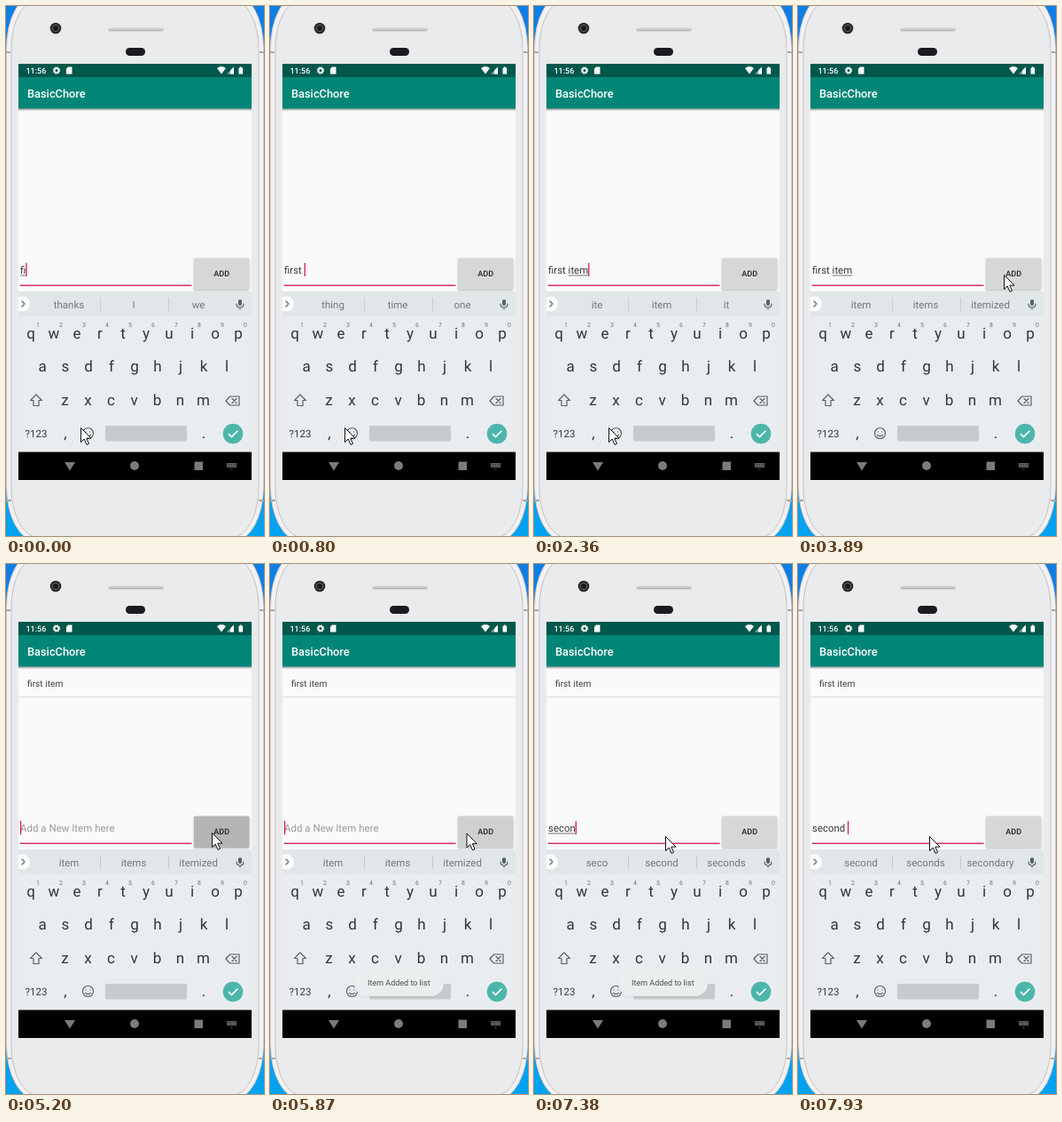
An HTML page that plays this animation: 291 px wide and 596 px high, repeating every 8000 ms.

```html
<!DOCTYPE html>
<html lang="en">
<head>
<meta charset="utf-8">
<title>To-do list on a phone</title>
<style>
html, body { margin: 0; width: 100%; height: 100%; overflow: hidden; background: linear-gradient(#0f7de4, #02a2f0); }
svg { display: block; width: 100%; height: 100%; font-family: Roboto, sans-serif; }
text { white-space: pre; text-rendering: geometricPrecision; }
.mid { text-anchor: middle; }
.line { fill: none; stroke: #55636a; stroke-width: 1.2; stroke-linecap: round; stroke-linejoin: round; }
#keys { font-size: 17px; fill: #2c383e; }
#keys .digit { font-size: 7px; fill: #69757b; }
#words { font-size: 11.5px; fill: #6f7a80; }
#entry { font-size: 11.4px; fill: #3a3a3a; }
#hint { font-size: 11.5px; fill: #9b9b9b; }
</style>
</head>
<body>
<svg viewBox="0 0 291 596">
  <defs>
    <linearGradient id="shade" x2="0" y2="1">
      <stop stop-color="#000" stop-opacity=".36"/>
      <stop offset="1" stop-color="#000" stop-opacity="0"/>
    </linearGradient>
    <filter id="lift" x="-20%" y="-30%" width="140%" height="170%">
      <feDropShadow dx="0" dy="1" stdDeviation="1" flood-opacity=".28"/>
    </filter>
    <filter id="glow" x="-20%" y="-30%" width="140%" height="170%">
      <feDropShadow dx="0" dy="1" stdDeviation="1" flood-opacity=".08"/>
    </filter>
    <clipPath id="screen"><rect x="14" y="65" width="263" height="468"/></clipPath>
  </defs>

  <!-- Phone body -->
  <rect x=".5" y="-14" width="290" height="616" rx="34" ry="62" fill="#f3f1f2" stroke="#cbc3c5"/>
  <rect x="6" y="-8" width="279" height="606" rx="31" ry="56" fill="#e9ebec" stroke="#c6c1c3"/>
  <path d="M0 52h5M286 52h5M0 556h6M285 556h6" stroke="#a9a5a7" stroke-width="2"/>
  <circle cx="56" cy="25" r="6.3" fill="#2a2a2c"/>
  <circle cx="56" cy="25" r="3.600" fill="#18181b" stroke="#66666a"/>
  <rect x="115" y="24.500" width="63" height="4.200" rx="2.100" fill="#cfcfd1"/>
  <path d="M116.500 27.500h60" stroke="#b2b2b5"/>
  <rect x="135" y="47" width="22" height="9" rx="4.500" fill="#1b1b1f"/>

  <g clip-path="url(#screen)">
    <rect x="14" y="65" width="263" height="256" fill="#fafafa"/>

    <!-- Status bar and title -->
    <rect x="14" y="65" width="263" height="15" fill="#00574b"/>
    <rect x="14" y="80" width="263" height="35.500" fill="#008577"/>
    <rect x="14" y="115.500" width="263" height="3" fill="url(#shade)"/>
    <g fill="#fff">
      <text x="22.500" y="76" font-size="9" font-weight="500">11:56</text>
      <circle cx="57" cy="72.500" r="2.500" fill="none" stroke="#fff" stroke-width="1.800"/>
      <circle cx="57" cy="72.500" r="3.800" fill="none" stroke="#fff" stroke-width="1" stroke-dasharray="1.500 1.480"/>
      <path d="M70 68.500h4.500v8h-6.500v-6z"/>
      <path d="M238 70q5-4 10 0l-5 6.500z"/>
      <path d="M257 68.500v8h-8z" opacity=".5"/>
      <path d="M257 68.500v8h-4v-4z"/>
      <path d="M262.500 69.500h1.300v-1h2v1h1.300v7h-4.600z"/>
      <text x="24" y="102.800" font-size="12.800" font-weight="500">BasicChore</text>
    </g>

    <g id="item">
      <text x="24" y="137.500" font-size="10.200" fill="#3c3c3c">first item</text>
      <path d="M14 149.500h263" stroke="#dedede"/>
    </g>

    <!-- Entry row -->
    <text id="hint" x="16" y="301">Add a New Item here</text>
    <text id="entry" x="16" y="301"><tspan id="done"></tspan><tspan id="draft"></tspan></text>
    <path id="underline" stroke="#555" stroke-width=".8"/>
    <rect id="caret" y="289" width="1.300" height="15" fill="#d81b60"/>
    <path d="M16 314.200h193.500" stroke="#d8316c" stroke-width="1.400"/>
    <rect id="button" x="212" y="283.500" width="62.500" height="35.500" rx="1.500" filter="url(#lift)"/>
    <text class="mid" x="243.200" y="304" font-size="9" font-weight="500" fill="#222">ADD</text>

    <!-- Keyboard -->
    <rect x="14" y="321" width="263" height="181" fill="#e9edf0"/>
    <rect x="14" y="321" width="263" height="28" fill="#e1e6e9"/>
    <circle cx="18.500" cy="335" r="8.500" fill="#fff"/>
    <path class="line" d="M18 332l3 3-3 3"/>
    <path d="M106.500 328v15M183.500 328v15" stroke="#c6ccd0"/>
    <g id="words"></g>
    <rect x="262" y="330" width="4" height="7" rx="2" fill="#55636a"/>
    <path class="line" d="M260 335q0 4 4 4t4-4M264 339v2"/>
    <g id="keys"></g>
    <path class="line" d="M34 437l6.500 6.500h-3.500v6h-6v-6h-3.500z"/>
    <path class="line" d="M252.500 439h10.500v10h-10.500l-4.500-5zM255 441.500l5 5m0-5l-5 5"/>
    <circle class="line" cx="92.500" cy="480.500" r="6"/>
    <path class="line" d="M90.300 478.800v.1M94.700 478.800v.1M89.500 482.300q3 3 6 0"/>
    <rect x="112" y="472" width="92" height="17.500" rx="1.500" fill="#c8cbcd"/>
    <circle cx="256" cy="481" r="11.300" fill="#4db6ac"/>
    <path d="M251 481l3.500 3.500 7-7" fill="none" stroke="#fff" stroke-width="1.600"/>

    <!-- Navigation bar -->
    <rect x="14" y="501.500" width="263" height="32"/>
    <g fill="#7b7b7b">
      <path d="M66 513h12l-6 9.500z"/>
      <circle cx="145" cy="517" r="5"/>
      <rect x="212.500" y="512.500" width="9.500" height="9.500"/>
      <path d="M249 514h11v5h-11zM253 520.500h3l-1.500 1.500z" opacity=".8"/>
      <path d="M250 515.500h9M250 517.500h9" stroke="#111" stroke-width=".7" stroke-dasharray="1 1"/>
    </g>

    <g id="toast">
      <rect x="95" y="457" width="101" height="29" rx="14.500" fill="#ebeeef" filter="url(#glow)"/>
      <text class="mid" x="145.300" y="474.300" font-size="9" fill="#4a4a4a">Item Added to list</text>
    </g>
  </g>

  <path id="pointer" d="M0 0v16l3.700-3.500 2.800 6.300 2.500-1.100-2.700-6.100h5.200z" fill="#fff" stroke="#111" stroke-width="1"/>
</svg>

<script>
const LOOP = 8000;
const $ = id => document.getElementById(id);

function addText(parent, x, y, text, className = "mid") {
  const node = document.createElementNS("http://www.w3.org/2000/svg", "text");
  node.setAttribute("x", x);
  node.setAttribute("y", y);
  node.setAttribute("class", className);
  node.textContent = text;
  return parent.appendChild(node);
}

function addRow(letters, x, y, className) {
  [...letters].forEach((letter, i) => addText($("keys"), x + i * 26, y, letter, className));
}

addRow("qwertyuiop", 28, 373.5);
addRow("asdfghjkl", 41, 411);
addRow("zxcvbnm", 66.5, 449);
addRow("1234567890", 36, 361, "mid digit");
addText($("keys"), 34, 484.5, "?123").style.fontSize = "11.5px";
addText($("keys"), 67, 486, ",");
addText($("keys"), 223, 486, ".");
const words = [71, 144, 217].map(x => addText($("words"), x, 339.6, ""));

// Each cue changes only the listed values; "_" starts the underlined word.
const cues = [
  [0, { text: "_fi", words: "thanks I we", caret: 1, item: 0, press: 0, toast: 0, at: [84.5, 474.5] }],
  [120, { words: "fi first find" }],
  [256, { text: "_fir" }],
  [392, { text: "_firs", words: "fir first fire" }],
  [528, { text: "_first", words: "firs first fits" }],
  [664, { words: "first firstly fist" }],
  [800, { text: "first ", words: "thing time one" }],
  [1260, { caret: 0 }],
  [1660, { text: "first _i", caret: 1 }],
  [1800, { words: "i I in" }],
  [1940, { text: "first _it" }],
  [2080, { words: "it its item" }],
  [2220, { text: "first _ite" }],
  [2360, { text: "first _item", words: "ite item it" }],
  [2510, { words: "item items itemized" }],
  [2940, { caret: 0 }],
  [3340, { caret: 1 }],
  [3480, { at: [140, 400] }],
  [3620, { at: [223, 301] }],
  [3890, { caret: 0, at: [232.5, 302.5] }],
  [4670, { press: 1 }],
  [5200, { text: "", caret: 1, item: 1 }],
  [5480, { toast: .5 }],
  [5615, { press: .6, toast: 1 }],
  [5750, { press: .2, at: [222, 303] }],
  [5885, { press: 0, at: [172, 305] }],
  [6020, { at: [148.5, 306.5] }],
  [6410, { caret: 0 }],
  [6545, { text: "_s", caret: 1 }],
  [6680, { words: "s so sorry" }],
  [6960, { text: "_se" }],
  [7099, { text: "_sec", words: "se see set" }],
  [7237, { text: "_seco", words: "sec second secret" }],
  [7376, { text: "_secon", words: "seco second seconds" }],
  [7514, { text: "_second", toast: .5 }],
  [7653, { words: "second seconds secondary", toast: 0 }],
  [7930, { text: "second " }]
];

function stateAt(time) {
  return Object.assign({}, ...cues.filter(([start]) => start <= time).map(cue => cue[1]));
}

function draw(time) {
  const state = stateAt(time);
  const [done, draft = ""] = state.text.split("_");
  $("done").textContent = done;
  $("draft").textContent = draft;
  const start = 16 + (done ? $("done").getComputedTextLength() : 0);
  const end = start + (draft ? $("draft").getComputedTextLength() : 0);
  $("underline").setAttribute("d", draft ? `M${start} 303H${end}` : "");
  $("caret").setAttribute("x", end);
  $("caret").style.opacity = state.caret;
  $("hint").style.opacity = state.text ? 0 : 1;
  $("item").style.opacity = state.item;
  $("toast").style.opacity = state.toast;
  const grey = 214 - 35 * state.press;
  $("button").style.fill = `rgb(${grey}, ${grey + 1}, ${grey + 1})`;
  state.words.split(" ").forEach((word, i) => words[i].textContent = word);
  $("pointer").setAttribute("transform", `translate(${state.at})`);
}

const began = performance.now();
let shown = -1;

function tick() {
  const time = (performance.now() - began) % LOOP;
  const current = cues.filter(([start]) => start <= time).length;
  if (current !== shown) draw(time);
  shown = current;
  requestAnimationFrame(tick);
}
tick();
</script>
</body>
</html>
```
